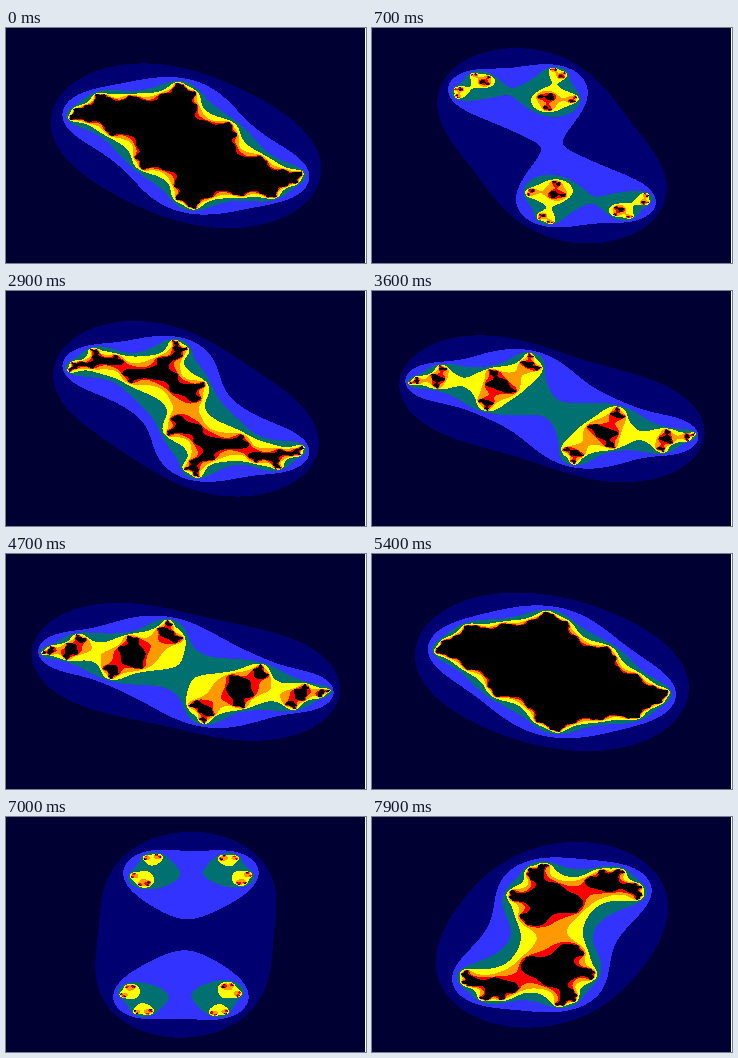
Write an HTML page with a canvas that moves like this. It is 360 by 235 pixels and loops after 8 s.

```html
<!DOCTYPE html>
<html lang="en">
<head>
<meta charset="utf-8">
<title>Julia set</title>
<style>
html, body { margin: 0; width: 100%; height: 100%; overflow: hidden; background: #000033; }
canvas { display: block; width: 360px; height: 235px; image-rendering: pixelated; }
</style>
</head>
<body>
<canvas id="stage" width="360" height="235"></canvas>
<script>
const W = 360, H = 235, STEP = 100, COUNT = 80;
const MID_X = 179.4, MID_Y = 117.3, UNIT_X = 90, UNIT_Y = 59;

// Colour by escape step; the last one is for points that stay.
const BANDS = ['#000033', '#000070', '#3333ff', '#007070', '#ffff00', '#ff9900', '#ff0000', '#000000'];

const ctx = document.getElementById('stage').getContext('2d');

// The constant c swings along the real axis while its imaginary part sinks and climbs.
function constantAt(u) {
  const swing = -1.733 + 0.1155 * u + 0.000067 * u * u;
  return [
    1.05 * Math.cos(swing),
    -0.68 + u * (-0.03 + u * (0.00074 - u * 0.0000018))
  ];
}

function escapeStep(x, y, cx, cy) {
  const last = BANDS.length - 1;
  for (let n = 0; n < last; n++) {
    const nx = x * x - y * y + cx;
    y = 2 * x * y + cy;
    x = nx;
    if (x * x + y * y > 4) return n;
  }
  return last;
}

function draw(frame) {
  // Each 28-frame section repeats its end point once.
  const [cx, cy] = constantAt(frame - Math.floor((frame + 5) / 28));
  for (let j = 0; j < H; j++) {
    const y = (j - MID_Y) / UNIT_Y;
    const bandAt = i => escapeStep((i - MID_X) / UNIT_X, y, cx, cy);
    // Fill each row in runs of equal colour.
    for (let from = 0, to; from < W; from = to) {
      const band = bandAt(from);
      for (to = from + 1; to < W && bandAt(to) === band;) to++;
      ctx.fillStyle = BANDS[band];
      ctx.fillRect(from, j, to - from, 1);
    }
  }
  ctx.fillStyle = '#fff';
  ctx.fillRect(W - 1, 0, 1, H);
}

let shown = 0;
const start = performance.now();
function tick() {
  const frame = Math.floor(Math.max(0, performance.now() - start) / STEP) % COUNT;
  if (frame !== shown) draw(shown = frame);
  requestAnimationFrame(tick);
}
draw(0);
requestAnimationFrame(tick);
</script>
</body>
</html>
```
